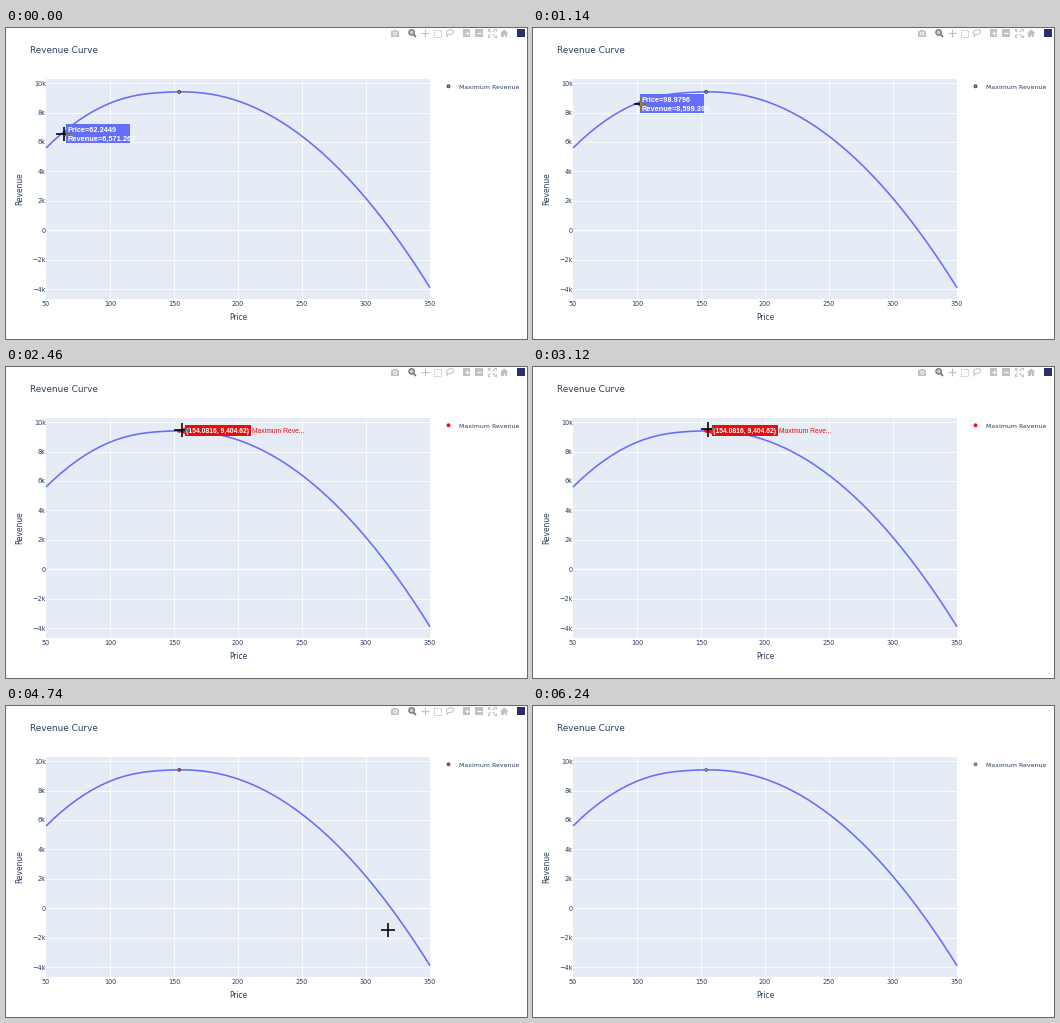
Write a matplotlib script that moves like this. It is 521 px wide and 311 px high and loops after 6300 ms.

```python
import numpy as np
import matplotlib.pyplot as plt
from matplotlib.animation import FuncAnimation
from matplotlib.patches import Circle, Ellipse, Polygon, Rectangle

W, H, DPI = 521, 311, 64
FRAMES, STEP = 105, 60
PT = 72 / DPI  # points per pixel

INK, BLUE, RED = "#2a3f5f", "#636efa", "#e60d0d"
PLOT_BG, ICON, ICON_ON = "#e5ecf6", "#bfc1c5", "#70757f"

# Revenue model: demand is a line that gets steeper at low prices
KNOWN_P = np.array([62.2449, 98.9796, 154.0816, 221.4286])
KNOWN_R = np.array([6571.263, 8599.393, 9404.62, 7984.377])


def model(p):
    bend = 9 * np.log1p(np.exp((140.3 - p) / 9))
    return p * (36.0585 - 0.3671 * (p - 221.4286) + 0.1418 * bend)


def revenue(p):
    return model(p) + np.interp(p, KNOWN_P, KNOWN_R - model(KNOWN_P))


def to_x(p):
    return 40 + (p - 50) * 1.28


def to_y(r):
    return 202.3 - r * 0.01472


price = np.linspace(50, 350, 50)
rev = revenue(price)
px, py = to_x(price), to_y(rev)
TOP = 17  # index of the maximum

fig = plt.figure(figsize=(W / DPI, H / DPI), dpi=DPI, facecolor="white")
ax = fig.add_axes([0, 0, 1, 1])
ax.set_xlim(0, W)
ax.set_ylim(H, 0)
ax.axis("off")


def line(xs, ys, color, width, z=2, **kw):
    kw.setdefault("solid_capstyle", "butt")
    return ax.plot(xs, ys, color=color, lw=width * PT, zorder=z, **kw)[0]


def label(x, y, s, size, color=INK, font="DejaVu Sans", z=4, **kw):
    return ax.text(x, y, s, fontsize=size * PT, color=color,
                   family=font, zorder=z, **kw)


def patch(shape, z=2):
    shape.set_zorder(z)
    return ax.add_patch(shape)


# Plot area, grid and axis labels
patch(Rectangle((40, 51), 384, 220, fc=PLOT_BG, lw=0), 1)
for p in range(50, 351, 50):
    x = to_x(p)
    if 50 < p < 350:
        line([x, x], [51, 271], "white", 0.8)
    label(x, 277.9, str(p), 6.5, ha="center")
for k in range(-4, 11, 2):
    y = to_y(1000 * k)
    line([40, 424], [y, y], "white", 0.8 if k else 1.2)
    s = f"{k}k".replace("-", "\u2212") if k else "0"
    label(39.8, y + 2.4, s, 6.5, ha="right")

label(24, 24.8, "Revenue Curve", 8.9)
label(232.3, 291.6, "Price", 7.5, ha="center")
label(14, 161, "Revenue", 7.5, ha="center", va="center", rotation=90)
label(453, 60.7, "Maximum Revenue", 6.2)
line(px, py, BLUE, 1.6, 3, solid_joinstyle="round")

dots = [patch(Circle(c, 1.5, lw=0.8 * PT), 4)
        for c in ((px[TOP], py[TOP]), (442.5, 58.3))]


def toolbar():
    def box(x, y, w, h, color=ICON, **kw):
        return patch(Rectangle((x, y), w, h, fc=color, lw=0, **kw))

    def stroke(xs, ys, color=ICON, width=1.1):
        return line(xs, ys, color, width)

    parts = [
        # camera
        box(385, 2.8, 8.4, 5.8), box(387.3, 1.6, 3.8, 1.5),
        patch(Circle((389.2, 5.6), 2, fc="white", lw=0)),
        patch(Circle((389.2, 5.6), 1.1, fc=ICON, lw=0)),
        # magnifier
        patch(Circle((405.6, 4.4), 2.7, fc="#c9ccd2", ec=ICON_ON, lw=1.3 * PT)),
        stroke([407.4, 410], [6.3, 9], ICON_ON, 1.7),
        # pan
        stroke([414.5, 423.1], [5, 5]), stroke([418.8, 418.8], [0.7, 9.3]),
        # box and lasso select
        patch(Rectangle((428, 1.5), 7, 7, fill=False, ec=ICON,
                        lw=PT, ls=(0, (1.5, 1)))),
        patch(Ellipse((444, 4.2), 7.4, 4.8, angle=-15, fill=False,
                      ec=ICON, lw=PT)),
        stroke([441.3, 441.6, 440.6], [6, 7.6, 9]),
        # zoom in and out
        box(456.8, 1.4, 7.4, 7.4), box(469.4, 1.4, 7.4, 7.4),
        stroke([458.5, 462.5], [5.1, 5.1], "white"),
        stroke([460.5, 460.5], [3.1, 7.1], "white"),
        stroke([471.1, 475.1], [5.1, 5.1], "white"),
        # home
        patch(Polygon([(494, 5.4), (498.3, 1.4), (502.6, 5.4)], fc=ICON, lw=0)),
        box(495.3, 5.2, 2.2, 3.6), box(499.1, 5.2, 2.2, 3.6),
        box(495.3, 5.2, 6, 1.4),
        box(511, 1, 8.2, 8.2, "#2b2f6b"),
    ]
    # autoscale
    for sx in (-1, 1):
        for sy in (-1, 1):
            parts.append(stroke([485.6 + sx, 485.6 + 3.6 * sx],
                                [5.1 + sy, 5.1 + 3.6 * sy]))
            parts.append(stroke([485.6 + 1.9 * sx, 485.6 + 3.9 * sx, 485.6 + 3.9 * sx],
                                [5.1 + 3.9 * sy, 5.1 + 3.9 * sy, 5.1 + 1.9 * sy]))
    return parts


bar = toolbar()

# Hover label and cursor
tip = patch(Polygon([(0, 0)] * 3, lw=0), 6)
tag = patch(Rectangle((0, 0), 1, 1, lw=0), 6)
ARIAL = dict(font="Liberation Sans", z=7)
row1 = label(0, 0, "", 7.4, "white", weight="bold", **ARIAL)
row2 = label(0, 0, "", 7.4, "white", weight="bold", **ARIAL)
side = label(0, 0, "Maximum Reve...", 6.8, RED, **ARIAL)
cross = [line([], [], "black", 1.6, 8) for _ in range(2)]
cross_inv = [line([], [], "black", 1.6, 9) for _ in range(2)]

# Cursor path: time, x, y
PATH = np.array([
    (0, 57.5, 106), (560, 82, 88), (1140, 108, 76), (1500, 145, 65),
    (1860, 179, 63), (2200, 176, 63), (3120, 175, 62.3), (3480, 217, 69),
    (3840, 263.5, 91), (4300, 330, 140), (4500, 358, 175),
    (4740, 382, 224), (5000, 402, 250), (5300, 424, 271),
])
LEAVE, BAR_OFF = 5300, 5640


def cursor(t):
    return [np.interp(t, PATH[:, 0], PATH[:, i]) for i in (1, 2)]


def hovered(t):
    """Index of the hovered point, or None."""
    x, y = cursor(max(t - STEP, 0))
    dist = np.hypot(px - x, py - y)
    dist[TOP] -= 4
    i = int(dist.argmin())
    return i if dist[i] < 13 and t < LEAVE else None


def marker_style(t):
    for end, style in ((1500, ("#8d9a9c", "#2c3434")), (3420, (RED, RED)),
                       (4440, ("#15151c", "#15151c")),
                       (5700, ("#a04a5c", "#6a4458"))):
        if t < end:
            return style
    return "#8fa09c", "#59676a"


def show_label(i):
    on, peak = i is not None, i == TOP
    for a in (tip, tag, row1):
        a.set_visible(on)
    row2.set_visible(on and not peak)
    side.set_visible(peak)
    if not on:
        return
    x, y = px[i], py[i]
    left = x + (5.3 if peak else 4.3)
    w, h = (66.2, 11) if peak else (64.5, 19)
    color = RED if peak else BLUE
    tag.set_bounds(left, y - h / 2, w, h)
    tip.set_xy([(x, y), (left + 0.2, y - 3.4), (left + 0.2, y + 3.4)])
    for a in (tip, tag):
        a.set_facecolor(color)
    row1.set_fontsize((6.8 if peak else 7.4) * PT)
    if peak:
        row1.set_text(f"({price[i]:.4f}, {rev[i]:,.2f})")
        row1.set_position((left + 1.6, y + 2.5))
        side.set_position((left + w + 1.6, y + 2.5))
    else:
        row1.set_text(f"Price={price[i]:.4f}")
        row2.set_text(f"Revenue={rev[i]:,.3f}")
        row1.set_position((left + 1.7, y - 2))
        row2.set_position((left + 1.7, y + 6.9))
    for a in cross_inv:
        a.set_color("#9c9133" if not peak else "#19c8c8")
        a.set_clip_path(tag)


def draw(n):
    t = n * STEP
    i = hovered(t)
    show_label(i)
    x, y = cursor(t)
    for pair, on in ((cross, t < LEAVE), (cross_inv, i is not None)):
        pair[0].set_data([x - 7.3, x + 7.3], [y, y])
        pair[1].set_data([x, x], [y - 7.3, y + 7.3])
        for a in pair:
            a.set_visible(on)
    fill, edge = marker_style(t)
    for d in dots:
        d.set_facecolor(fill)
        d.set_edgecolor(edge)
    for a in bar:
        a.set_visible(t < BAR_OFF)
    return []


anim = FuncAnimation(fig, draw, frames=FRAMES, interval=STEP,
                     init_func=lambda: draw(0), repeat=True,
                     repeat_delay=0, blit=False)
plt.show()
```
